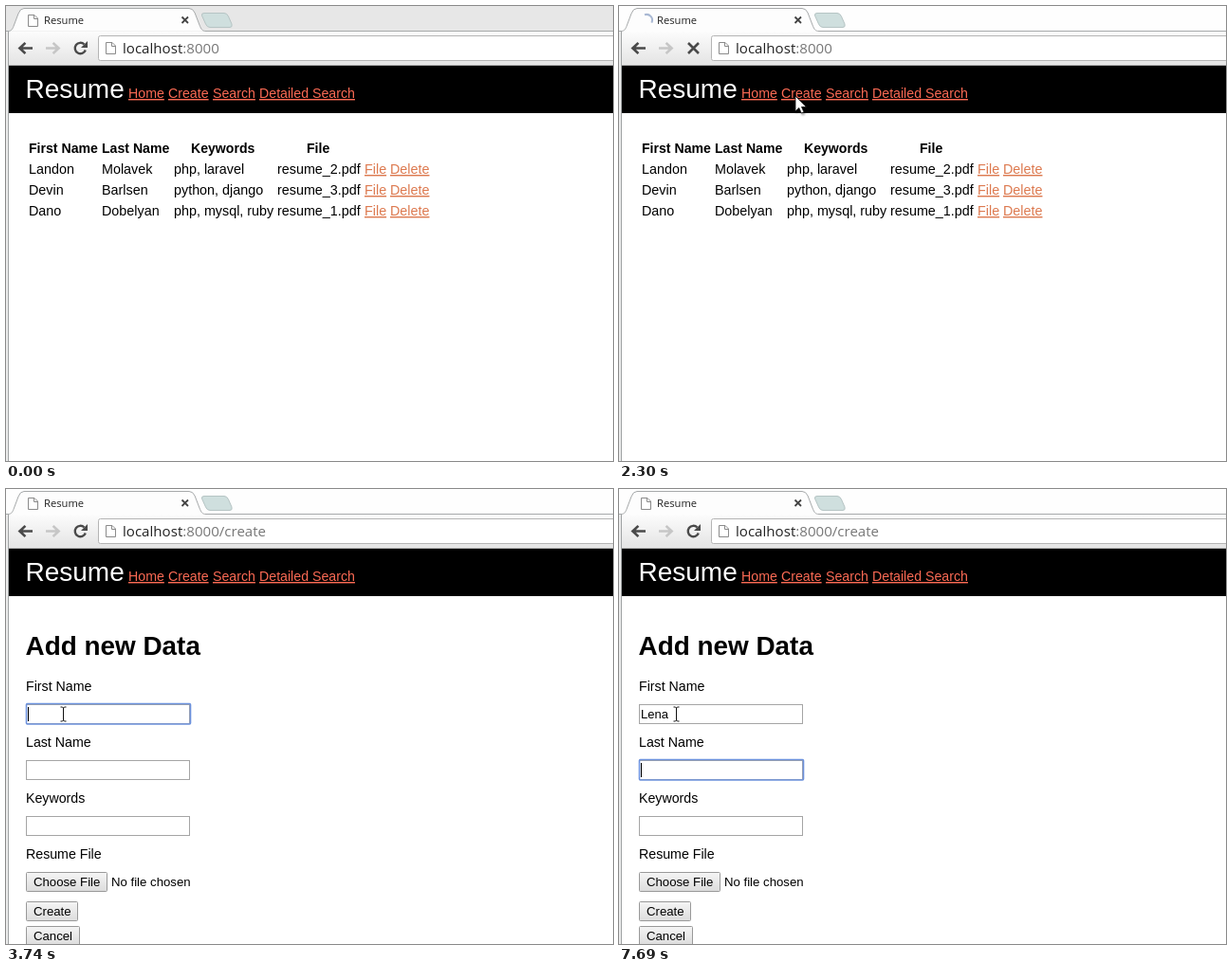
Recreate the animation shown at these times as an HTML page. Size 640 by 480 pixels, loop 8 s.

```html
<!DOCTYPE html>
<html lang="en">
<head>
<meta charset="utf-8">
<title>Resume</title>
<style>
  html, body { margin: 0; width: 100%; height: 100%; overflow: hidden; background: #fff; }
  svg { display: block; width: 640px; height: 480px; }
  text { font: 14.2px "Liberation Sans", Arial, sans-serif; white-space: pre; }
  .ui { font-family: "Open Sans", "Noto Sans", sans-serif; }
  .tab { font-size: 11.2px; fill: #222; }
  .url { font-size: 15.1px; fill: #777; }
  .host { fill: #222; }
  .brand { font-size: 28px; fill: #fff; }
  .nav { fill: #fb6a54; text-decoration: underline; }
  .cell { font-size: 14.35px; }
  .link { fill: #dd7a50; text-decoration: underline; }
  .head { font-weight: bold; font-size: 14.1px; }
  .title { font-weight: bold; font-size: 27.9px; }
  .control { font-size: 13.2px; }
  .typed { font-size: 13px; }
  .cursor { filter: drop-shadow(1px 2px 1px #0006); }
</style>
</head>
<body>
<svg viewBox="0 0 640 480">
  <defs>
    <linearGradient id="bar" x2="0" y2="1">
      <stop stop-color="#fcfcfc"/><stop offset="1" stop-color="#e4e4e4"/>
    </linearGradient>
    <linearGradient id="button" x2="0" y2="1">
      <stop stop-color="#f5f5f5"/><stop offset="1" stop-color="#dcdcdc"/>
    </linearGradient>
    <g id="sheet">
      <path d="M.5 .5H7L10.5 4V12.5H.5Z" fill="#fff" stroke="#8b8b8b"/>
      <path d="M6.5 .5V4.5H10.5" fill="none" stroke="#8b8b8b"/>
    </g>
    <path id="back" d="M7 0L0 6.5L7 13L8.8 11.2L5.3 7.8H15.5V5.2H5.3L8.8 1.8Z"/>
  </defs>

  <rect width="640" height="480" fill="#fff"/>
  <rect id="strip" width="640" height="27"/>
  <rect y="27" width="640" height="35" fill="url(#bar)"/>
  <path d="M0 26.5H2C6 26.5 7 24 8.500 20L13 8Q15 2.500 19 2.500H193Q197 2.500 199 7L204 20C206 25 207 26.500 211 26.500H640" fill="#fdfdfd" stroke="#a6a9aa"/>
  <path d="M209 7.500H230Q233 7.500 234.500 11L238 19Q239 22.500 236 22.500H215Q212 22.500 210.500 19L206.500 10Q206 7.500 209 7.500Z" fill="#cfdfde" stroke="#b6c4c4"/>
  <path d="M185.500 11.500L192 18M192 11.500L185.500 18" stroke="#444" stroke-width="1.800"/>
  <text class="ui tab" x="40" y="19">Resume</text>
  <use id="favicon" href="#sheet" x="23" y="9"/>
  <path id="spinner" d="M-2 -5.700A6 6 0 0 1 5.400 2.600" fill="none" stroke="#a9b8d3" stroke-width="2"/>

  <use href="#back" x="12.500" y="38" fill="#4a4a4a"/>
  <use href="#back" transform="translate(57.500 38) scale(-1 1)" fill="#c6c6c6"/>
  <g id="reload">
    <path d="M82.500 40.500A5.700 5.700 0 1 0 83.800 46.500" fill="none" stroke="#4a4a4a" stroke-width="2.400"/>
    <path d="M86 37V44H79Z" fill="#4a4a4a"/>
  </g>
  <path id="stop" d="M73 39L84 50M84 39L73 50" stroke="#4a4a4a" stroke-width="2.600"/>
  <rect x="97.500" y="31.500" width="550" height="26" rx="2" fill="#fff" stroke="#b5b5b5"/>
  <use href="#sheet" x="105" y="38"/>
  <text class="ui url" x="123" y="50"><tspan class="host">localhost</tspan>:8000<tspan id="path"></tspan></text>

  <path d="M0 62.500H640" stroke="#b4b4b4"/>
  <rect y="27" width="2" height="453" fill="#ececec"/>
  <path d="M2.500 27V480" stroke="#a0a3a4"/>
  <rect x="3" y="63" width="637" height="50"/>

  <g id="nav"></g>
  <g id="home"></g>
  <g id="create"></g>

  <rect id="ring" x="21.500" y="226.500" width="173" height="21.500" rx="1" fill="none" stroke="#6d92dd" stroke-width="1.600"/>
  <text id="typed" class="typed" x="23" y="242"></text>
  <rect id="caret" width="1" height="15"/>

  <g id="arrow" class="cursor">
    <path d="M0 0V16L3.800 12.500L6.300 18L9 17L6.500 11.500H11.500Z" fill="#fff" stroke="#111" stroke-width=".8"/>
  </g>
  <g id="hand" class="cursor">
    <path d="M0 1.500Q1.500 -.500 3 1.500V7.500Q4.500 6.200 6 7.800Q7.500 6.800 9 8.500Q10.500 7.500 12 9.500Q13.200 9.300 13.500 11V15.500Q13 18.500 11.500 20V22.500H2.500V20.500Q0 18 -2.500 14.500Q-5.500 11.500 -4.500 10.500Q-3 9.500 0 13Z" fill="#fff" stroke="#111" stroke-width=".8"/>
    <path d="M3 7.500V12M6 8V12M9 8.500V12" stroke="#111" stroke-width=".8"/>
  </g>
  <path id="beam" d="M-3 -7.500H-1L0 -6.500L1 -7.500H3M0 -6.500V6.500M-3 7.500H-1L0 6.500L1 7.500H3" fill="none" stroke="#111"/>
</svg>
<script>
const $ = id => document.getElementById(id);
const text = (x, y, label, cls = '') => `<text class="${cls}" x="${x}" y="${y}">${label}</text>`;

$('nav').innerHTML = text(20.5, 97, 'Resume', 'brand')
  + text(129, 97, 'Home', 'nav') + text(171, 97, 'Create', 'nav')
  + text(218, 97, 'Search', 'nav') + text(267, 97, 'Detailed Search', 'nav');

const columns = [24, 101, 177, 286, 378, 405];
const people = [
  ['Landon', 'Molavek', 'php, laravel', 'resume_2.pdf'],
  ['Devin', 'Barlsen', 'python, django', 'resume_3.pdf'],
  ['Dano', 'Dobelyan', 'php, mysql, ruby', 'resume_1.pdf'],
];
$('home').innerHTML =
  [[24, 'First Name'], [101, 'Last Name'], [195, 'Keywords'], [317, 'File']]
    .map(([x, label]) => text(x, 155, label, 'head')).join('')
  + people.map((person, row) => [...person, 'File', 'Delete']
    .map((cell, i) => text(columns[i], 177 + 22 * row, cell, i > 3 ? 'cell link' : 'cell')).join('')).join('');

const field = (label, i) => text(21, 213 + 59 * i, label)
  + `<rect x="21.5" y="${227.5 + 59 * i}" width="172" height="20" fill="#fff" stroke="#a5a5a5"/>`;
const button = (label, y, width) =>
  `<rect x="21.5" y="${y + .5}" width="${width}" height="20" rx="1" fill="url(#button)" stroke="#999"/>`
  + text(29, y + 15, label, 'control');
$('create').innerHTML = text(20.5, 175, 'Add new Data', 'title')
  + ['First Name', 'Last Name', 'Keywords'].map(field).join('')
  + text(21, 390, 'Resume File') + button('Choose File', 404, 85)
  + text(111, 419, 'No file chosen', 'control')
  + button('Create', 435, 54) + button('Cancel', 461, 56);

// Each step keeps the previous state except for what it lists.
const steps = [
  [0, { page: 'home', strip: '#e7e7e7', cursor: null, spin: null, focus: -1, name: '', caret: false }],
  [500, { cursor: ['arrow', 324, 363] }],
  [660, { cursor: ['arrow', 262, 253] }],
  [820, { cursor: ['arrow', 193, 140] }],
  [980, { cursor: ['hand', 161, 96.5] }],
  [1640, { cursor: ['hand', 177, 94.5] }],
  [1800, { cursor: ['hand', 185, 93.5] }],
  [2300, { cursor: ['arrow', 186, 95], strip: '#fefefe', spin: 0 }],
  [2460, { spin: -90 }],
  [2620, { spin: -180 }],
  [2780, { spin: -270 }],
  [2940, { spin: null, page: 'create', cursor: ['hand', 185, 93.5] }],
  [3100, { cursor: ['arrow', 132, 165] }],
  [3260, { cursor: ['beam', 68.5, 246.5] }],
  [3420, { cursor: ['beam', 63.5, 242.5] }],
  [3580, { cursor: ['beam', 60.5, 237.5] }],
  [3740, { focus: 0, caret: true }],
  [4240, { caret: false }],
  [4740, { caret: true }],
  [4900, { name: 'L' }],
  [5060, { name: 'Le' }],
  [5390, { name: 'Leo' }],
  [5890, { caret: false }],
  [6550, { caret: true }],
  [6710, { name: 'Le' }],
  [6870, { name: 'Len' }],
  [7370, { caret: false }],
  [7530, { name: 'Lena', caret: true }],
  [7690, { focus: 1 }],
];

const show = (id, visible) => $(id).setAttribute('display', visible ? 'inline' : 'none');
const move = (id, value) => $(id).setAttribute('transform', value);

function draw(time) {
  const state = Object.assign({}, ...steps.filter(([at]) => at <= time).map(([, change]) => change));
  const { page, strip, cursor, spin, focus, name, caret } = state;
  const loading = spin !== null;

  show('home', page === 'home');
  show('create', page === 'create');
  $('path').textContent = page === 'create' ? '/create' : '';

  $('strip').setAttribute('fill', strip);
  show('favicon', !loading);
  show('reload', !loading);
  show('spinner', loading);
  show('stop', loading);
  move('spinner', `translate(29 15) rotate(${spin || 0})`);

  $('typed').textContent = name;
  show('ring', focus >= 0);
  show('caret', caret);
  move('ring', `translate(0 ${59 * focus})`);
  move('caret', `translate(${focus === 0 ? 23 + 7 * name.length : 23} ${230 + 59 * focus})`);

  for (const kind of ['arrow', 'hand', 'beam']) show(kind, cursor && cursor[0] === kind);
  if (cursor) move(cursor[0], `translate(${cursor[1]} ${cursor[2]})`);
}

const start = performance.now();
function tick() {
  draw((performance.now() - start) % 8000);
  requestAnimationFrame(tick);
}
tick();
</script>
</body>
</html>
```
